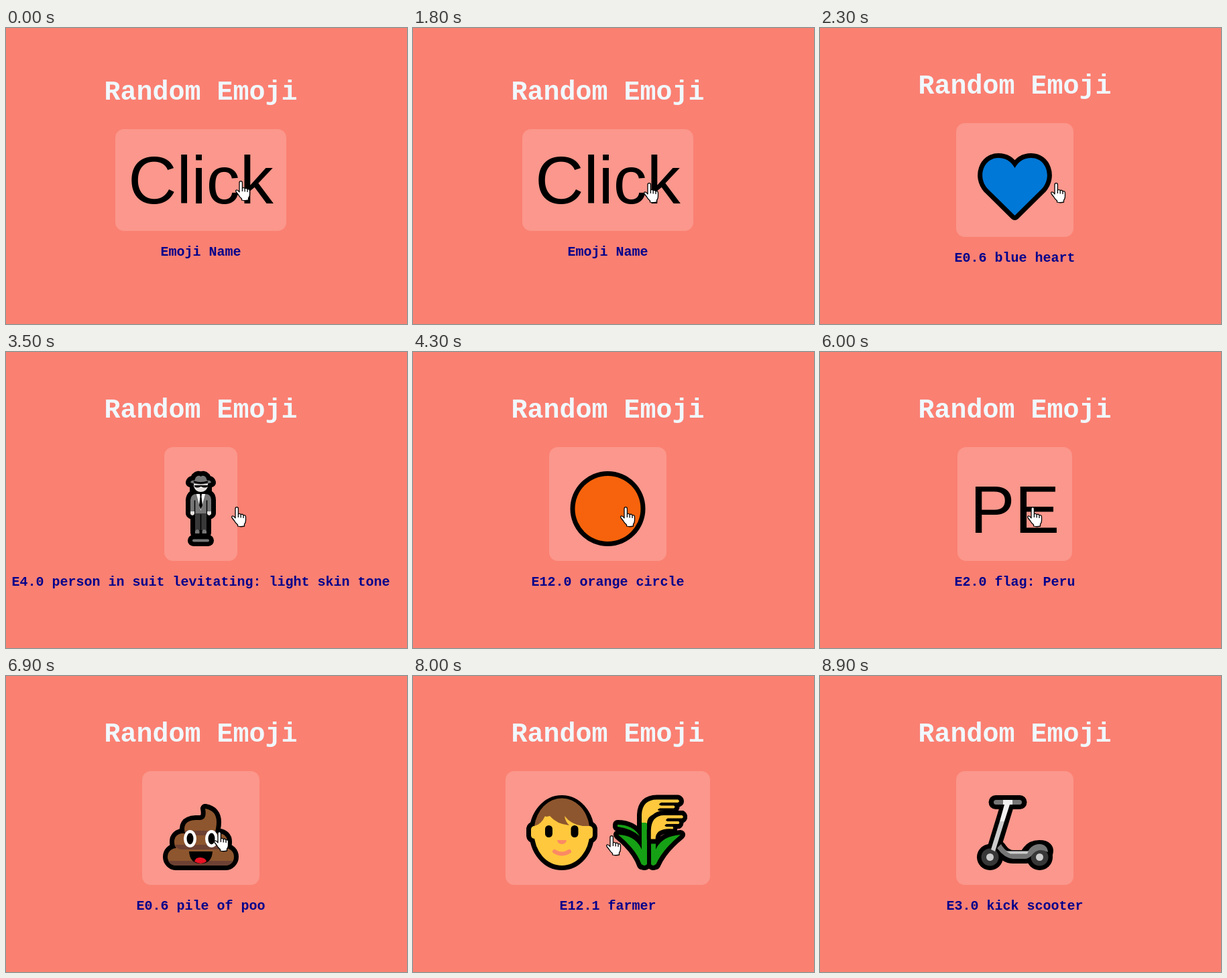
An HTML page for the animation above (9.7 s loop, 598 px wide and 442 px high).

```html
<!DOCTYPE html>
<html lang="en">
<head>
<meta charset="utf-8">
<title>Random Emoji</title>
<style>
  html, body { margin: 0; width: 100%; height: 100%; overflow: hidden; background: #fa8072; }
  svg { display: block; width: 598px; height: 442px; }
  text { text-anchor: middle; }
  .mono { font-family: "Courier New", "Liberation Mono", monospace; font-weight: bold; }
  #title { font-size: 40px; fill: #f0f8ff; }
  #name { font-size: 20px; fill: #00008b; }
  #button { fill: #fff; fill-opacity: .18; }
  .big { font: 100px "Liberation Sans", Arial, sans-serif; }
  .scene { visibility: hidden; }
  .scene.on { visibility: visible; }
  .ink { fill: #000; stroke: #000; stroke-width: 14; stroke-linejoin: round; stroke-linecap: round; }
  .line { fill: none; stroke: #000; stroke-linecap: round; stroke-linejoin: round; }
  .skin { fill: #ffc83d; }
  .brown { fill: #8e562e; }
  .dark { fill: #6d4133; }
  .grey { fill: #767676; }
  .light { fill: #ccc; }
  .coal { fill: #383838; }
  .white { fill: #fff; }
  .pale { fill: #e6e2e0; }
  .red { fill: #e81224; }
  .green { fill: #16a015; }
</style>
</head>
<body>
<svg viewBox="0 0 598 442">
  <defs>
    <g id="head">
      <circle cx="290.5" cy="234" r="56"/>
      <circle class="skin" cx="290.5" cy="234" r="49"/>
    </g>
    <path id="heart" d="M290.5 280L250 240C234 222 244 194 266 194Q282 194 290.5 209Q299 194 315 194C337 194 347 222 331 240Z"/>
    <path id="hat" d="M275 195Q276 191 281 192L283 187Q287 183 290.500 186Q294 183 298 187L300 192Q305 191 306 195Q290.500 201 275 195Z"/>
    <path id="jacket" d="M275 221Q276 212 284 212H297Q306 212 306 221V238H299V241H282V238H275Z"/>
    <g id="pile">
      <rect x="241" y="257" width="99" height="26" rx="13"/>
      <rect x="251" y="235" width="79" height="26" rx="12"/>
      <path d="M268 238Q260 216 283 215H290Q300 214 297 198Q314 201 314 218Q314 228 310 238Z"/>
    </g>
    <g id="face">
      <ellipse cx="222" cy="234" rx="41.500" ry="49"/>
      <rect x="176" y="224" width="12" height="19" rx="5"/>
      <rect x="256" y="224" width="12" height="19" rx="5"/>
    </g>
    <path id="ear" d="M341 220V207Q342 184.500 364 184.500H395Q399 187 395 189H370Q364 192 370 193.500H389Q392 195.500 389 197.500H368Q362 200 368 201.500H379Q381 203.500 379 205Q349 203 349 220Z"/>
    <use id="ear2" href="#ear" transform="matrix(.86 0 0 1 61.500 23.500)"/>
    <g id="leaves">
      <path d="M306 237Q332 238 341 259V282Q333 259 306 237Z"/>
      <path d="M305 222Q328 222 338 239Q326 228 305 225Z"/>
      <path d="M399 237Q371 239 362 259V282Q372 259 399 237Z"/>
    </g>
    <g id="stems">
      <path d="M341 219h8v62q-4 4-8 0z"/>
      <path d="M355 243h7v38q-4 4-7 0z"/>
    </g>
    <g id="wheel">
      <circle r="19.500"/>
      <circle class="coal" r="13"/>
      <circle class="light" r="5.500"/>
    </g>
  </defs>

  <text id="title" class="mono" x="290.500">Random Emoji</text>
  <rect id="button" rx="13"/>
  <text id="name" class="mono" x="290.500"></text>

  <g class="scene" id="click"><text class="big" x="290.500" y="262">Click</text></g>

  <g class="scene" id="blue">
    <use href="#heart" class="ink"/>
    <use href="#heart" fill="#0078d7"/>
  </g>

  <g class="scene" id="suit">
    <g class="ink">
      <use href="#hat"/>
      <use href="#jacket"/>
      <path d="M281 195H300V212H281ZM275 238H306V241Q303 245 299 241V270H282V241Q278 245 275 241Z"/>
      <path d="M279.500 281.500H301.500" stroke-width="17"/>
    </g>
    <path class="pale" d="M280 196H301V201Q298 209 290.500 209T280 201Z"/>
    <use href="#hat" class="grey"/>
    <path class="line" d="M281 194Q290 197 300 194" stroke-width="2.500"/>
    <path d="M281 199H301V201Q296 204 291.500 201H290Q285 204 281 201Z"/>
    <rect class="coal" x="282" y="240" width="17" height="26"/>
    <use href="#jacket" class="grey"/>
    <path class="white" d="M284 212H297L290.500 237Z"/>
    <path d="M289 212h3l-.5 4 1.500 13-2.500 6-2.500-6 1.500-13z"/>
    <path class="line" d="M281.500 222V240M299.500 222V240M290.500 243V267" stroke-width="1.500"/>
    <path class="pale" d="M275 238h6v4q-3 4-6 0zM300 238h6v4q-3 4-6 0z"/>
    <path class="grey" d="M282 271v-4q3-4 6.500 0v4zM292.500 271v-4q3-4 6.500 0v4z"/>
    <rect class="grey" x="278" y="279.500" width="25" height="4" rx="2"/>
  </g>

  <g class="scene" id="orange">
    <circle cx="290.500" cy="234" r="56"/>
    <circle cx="290.500" cy="234" r="49" fill="#f7630c"/>
  </g>

  <g class="scene" id="fiji"><text class="big" x="290.500" y="270">FJ</text></g>

  <g class="scene" id="clock">
    <circle cx="290.500" cy="234" r="56"/>
    <circle class="light" cx="290.500" cy="234" r="49"/>
    <circle class="white" cx="290.500" cy="234" r="42"/>
    <g id="dots" class="light" transform="translate(290.500 234)"></g>
    <path class="line" d="M290.500 234V258.500" stroke-width="7"/>
    <path class="line" d="M290 236L287.500 251" stroke-width="7.500" style="stroke:#404040"/>
    <circle class="red" cx="290.500" cy="234" r="7"/>
  </g>

  <g class="scene" id="wink">
    <use href="#head"/>
    <ellipse cx="271" cy="225" rx="6" ry="9"/>
    <path class="line" d="M301 226Q310 217 319 226M264 250Q290 266 317 250" stroke-width="6"/>
    <path class="red" d="M279 258H303V268Q302 279 291 279T279 268Z"/>
  </g>

  <g class="scene" id="peru"><text class="big" x="290.500" y="270">PE</text></g>
  <g class="scene" id="italy"><text class="big" x="290.500" y="270">IT</text></g>

  <g class="scene" id="poo">
    <use href="#pile" class="ink"/>
    <use href="#pile" class="brown"/>
    <path class="dark" d="M267 231H313L310 238H268ZM252 252H329Q326 259 320 259H261Q254 258 252 252ZM242 276H339Q335 283 328 283H253Q245 283 242 276Z"/>
    <g class="white">
      <ellipse cx="274.500" cy="243" rx="9.500" ry="13"/>
      <ellipse cx="306.500" cy="243" rx="9.500" ry="13"/>
    </g>
    <ellipse cx="274.500" cy="243" rx="5" ry="8.500"/>
    <ellipse cx="306.500" cy="243" rx="5" ry="8.500"/>
    <path d="M273 262H308Q307 280 290.500 280T273 262Z"/>
    <path class="red" d="M281 277Q283 270 290.500 271T299 277Q291 283 281 277Z"/>
  </g>

  <g class="scene" id="halo">
    <use href="#head"/>
    <path class="line" d="M264 223Q271 215 278 223M303 223Q310 215 317 223M267 250Q290 272 314 250" stroke-width="6"/>
    <ellipse class="line" cx="290.500" cy="190" rx="35" ry="9" stroke-width="12"/>
    <ellipse class="line" cx="290.500" cy="190" rx="35" ry="9" stroke-width="5" style="stroke:#00b7f1"/>
  </g>

  <g class="scene" id="farmer">
    <use href="#face" class="ink"/>
    <use href="#face" class="skin"/>
    <path class="brown" d="M181 224A41.500 49 0 0 1 263 224H253Q236 222 226 209Q227 217 233 223Q214 221 204 209Q197 211 197 209Q191 222 181 224Z"/>
    <rect x="197" y="223" width="11" height="18" rx="5.500"/>
    <rect x="235.500" y="223" width="11" height="18" rx="5.500"/>
    <path fill="#fb8a64" d="M215 245H229Q228 251 222 251T215 245Z"/>
    <path class="line" d="M211 262Q222 269 233 262" stroke-width="6" style="stroke:#fb8a64"/>
    <g class="ink">
      <use href="#ear"/>
      <use href="#leaves"/>
      <use href="#stems"/>
      <use href="#ear2"/>
    </g>
    <use href="#leaves" class="green"/>
    <use href="#stems" class="green"/>
    <use href="#ear" class="skin"/>
    <use href="#ear2" class="ink"/>
    <path class="green" d="M341 219h7v20h-7z"/>
    <use href="#ear2" class="skin"/>
  </g>

  <g class="scene" id="scooter">
    <path class="line" d="M262 188.500H298" stroke-width="21"/>
    <path class="line" d="M280 190L258 262" stroke-width="20"/>
    <path class="line" d="M267 256Q276 270 288 270H307Q313 255 327 255T337 265" stroke-width="20"/>
    <use href="#wheel" x="253.500" y="270.500"/>
    <use href="#wheel" x="327.500" y="270.500"/>
    <path class="grey" d="M264 257L270 251Q277 264 287 264H309Q315 251 328 251Q339 252 340 263Q327 256 318 265Q312 273 306 273H288Q275 272 264 257Z"/>
    <path class="light" d="M277 261.500H311L309 265.500H284Z"/>
    <rect class="grey" x="259" y="185" width="42" height="7" rx="3.500"/>
    <path fill="#f2f2f2" d="M273 185H287V192H283L275 217H268L275 192H273Z"/>
    <path class="light" d="M268 217H275L261 262L255 259Z"/>
  </g>

  <g id="hand" stroke="#000" stroke-width="1.300" stroke-linejoin="round">
    <path class="white" d="M6 17V3Q6 .7 8.200 .7T10.400 3V11Q12.500 9.500 14.200 11.700Q16.500 10.500 18 12.700Q21.500 12 21.500 15.500V20Q21.500 24 19.500 26V29Q14 30.500 9.500 29V27Q6 24 4.500 21L1.300 17Q-.2 14.500 1.800 13.800Q4 13.500 6 17Z"/>
    <path fill="none" d="M10.400 11V16M14.200 12V16.500M18 13V17"/>
  </g>
</svg>
<script>
const LOOP = 9700, STEP = 100, CENTRE = 290.5, HIDE_HAND = 8300;

// start time, scene, label, button width
const scenes = [
  [0, "click", "Emoji Name", 255],
  [2000, "blue", "E0.6 blue heart", 175],
  [2700, "suit", "E4.0 person in suit levitating: light skin tone", 109],
  [4000, "orange", "E12.0 orange circle", 175],
  [4500, "fiji", "E2.0 flag: Fiji", 149],
  [5200, "clock", "E0.7 six-thirty", 175],
  [5600, "wink", "E0.6 winking face with tongue", 175],
  [6000, "peru", "E2.0 flag: Peru", 171],
  [6500, "italy", "E2.0 flag: Italy", 127],
  [6900, "poo", "E0.6 pile of poo", 175],
  [7300, "halo", "E1.0 smiling face with halo", 175],
  [7800, "farmer", "E12.1 farmer", 305],
  [8200, "scooter", "E3.0 kick scooter", 175]
];

// time, x, y of the pointer
const path = [
  [0, 342, 228], [1700, 342, 228], [1800, 344, 231], [3400, 344, 231],
  [3500, 336, 231], [3900, 309, 231], [6800, 309, 231], [6900, 310, 232],
  [7500, 310, 232], [8000, 288, 238], [LOOP, 288, 238]
];

const $ = id => document.getElementById(id);
const set = (el, attrs) => Object.entries(attrs).forEach(([k, v]) => el.setAttribute(k, v));

for (let i = 0; i < 12; i++) {
  const a = i * Math.PI / 6;
  const dot = document.createElementNS("http://www.w3.org/2000/svg", "circle");
  set(dot, { cx: 35 * Math.sin(a), cy: 35 * Math.cos(a), r: 3.5 });
  $("dots").append(dot);
}

function showScene(t) {
  const [, id, label, width] = scenes.findLast(s => s[0] <= t);
  const first = id === "click";
  for (const s of scenes) $(s[1]).classList.toggle("on", s[1] === id);
  set($("title"), { y: first ? 107 : 98 });
  set($("name"), { y: first ? 340 : 349 });
  $("name").textContent = label;
  set($("button"), { x: CENTRE - width / 2, y: first ? 151 : 142, width, height: first ? 152 : 170 });
}

function moveHand(t) {
  const i = path.findIndex(p => p[0] > t);
  const [t0, x0, y0] = path[i - 1], [t1, x1, y1] = path[i];
  const k = (t - t0) / (t1 - t0);
  const x = Math.round(x0 + (x1 - x0) * k), y = Math.round(y0 + (y1 - y0) * k);
  set($("hand"), { transform: `translate(${x} ${y})`, visibility: t < HIDE_HAND ? "visible" : "hidden" });
}

const start = performance.now();
let last = -1;
function draw() {
  const now = Math.max(0, performance.now() - start) % LOOP;
  const t = Math.floor(now / STEP) * STEP;
  if (t !== last) {
    showScene(t);
    moveHand(t);
    last = t;
  }
  requestAnimationFrame(draw);
}
draw();
</script>
</body>
</html>
```
